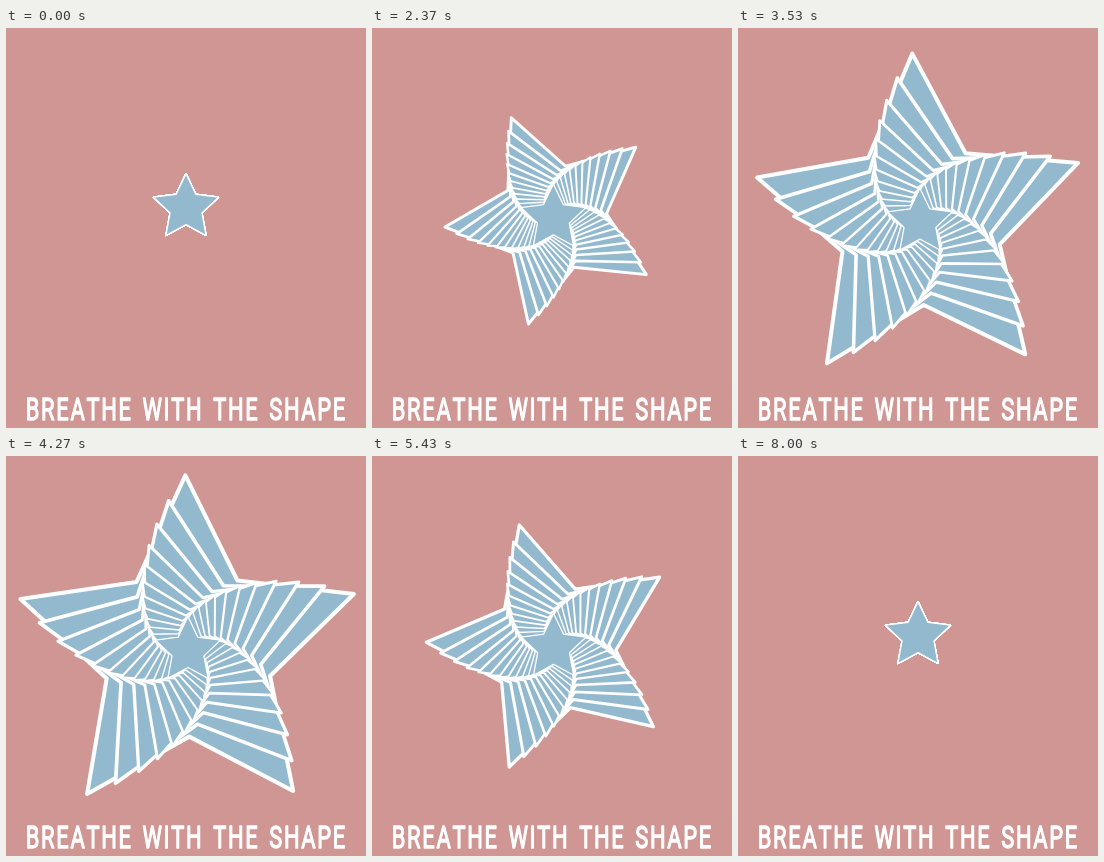
Recreate the animation shown at these times as an HTML page. Size 360 by 400 pixels, loop 8260 ms.

```html
<!DOCTYPE html>
<html lang="en">
<head>
<meta charset="utf-8">
<title>Breathe with the shape</title>
<style>
  html, body { margin: 0; width: 100%; height: 100%; overflow: hidden; background: #d09693; }
  svg { display: block; width: 360px; height: 400px; }
  polygon { fill: #93b9cf; stroke: #fff; stroke-linejoin: round; }
  text {
    font: 400 31.3px Roboto, "Open Sans", sans-serif;
    font-kerning: none;
    letter-spacing: 2.4px;
    word-spacing: 4px;
    fill: #fff;
    stroke: #fff;
    stroke-width: 1.2px;
    stroke-linejoin: round;
    vector-effect: non-scaling-stroke;
  }
</style>
</head>
<body>
<svg viewBox="0 0 360 400">
  <g id="stars"></g>
  <text transform="translate(19.8 392.4) scale(.7 1)">BREATHE WITH THE SHAPE</text>
</svg>
<script>
  const LOOP = 8260, START = 80, END = 8020, STEP = 100 / 3;
  const LAYERS = 11, RADIUS = 34.2, NOTCH = 0.49;
  const GROW = 0.161, TURN = 6.5; // per layer, at full breath

  const group = document.getElementById("stars");
  const stars = Array.from({ length: LAYERS + 1 }, () =>
    group.appendChild(document.createElementNS("http://www.w3.org/2000/svg", "polygon")));

  // Breath from 0 (rest) to 1 (full) and back, at 30 pictures a second
  function breath(ms) {
    if (ms < 100 || ms >= 8000) return 0;
    const t = 100 + Math.floor((ms - 100) / STEP + 0.15) * STEP;
    const e = Math.sin(Math.PI * (t - START) / (END - START)) ** 2;
    return e + 0.3 * e * (1 - e);
  }

  // Each layer is scaled and turned once more than the one inside it
  function place(star, layer, u) {
    const scale = (1 + GROW * u) ** layer;
    const cx = 180 + 2 * u, cy = 179.8 + 15 * u;
    const points = [];
    for (let i = 0; i < 10; i++) {
      const r = RADIUS * scale * (i % 2 ? NOTCH : 1);
      const a = (TURN * u * layer + 36 * i) * Math.PI / 180;
      points.push((cx + r * Math.sin(a)).toFixed(2) + "," + (cy - r * Math.cos(a)).toFixed(2));
    }
    star.setAttribute("points", points.join(" "));
    star.setAttribute("stroke-width", (1.3 * scale ** 0.7).toFixed(2));
  }

  const origin = performance.now();
  function draw() {
    const u = breath((performance.now() - origin) % LOOP);
    stars.forEach((star, i) => place(star, LAYERS - i, u));
    requestAnimationFrame(draw);
  }
  draw();
</script>
</body>
</html>
```
